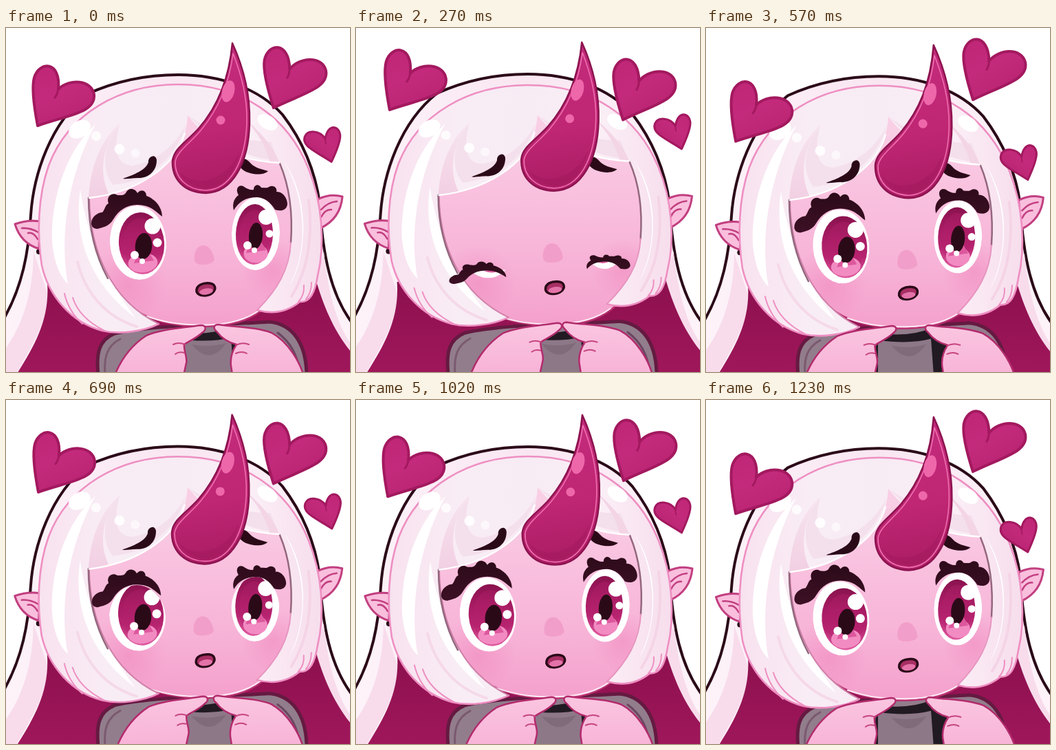
These frames come from a looping animation (500 by 500 pixels, 1.33 s). An HTML page with a canvas:

```html
<!DOCTYPE html>
<html lang="en">
<head>
<meta charset="utf-8">
<title>Shy horned girl</title>
<style>
html, body { margin: 0; width: 100%; height: 100%; overflow: hidden; background: #fff; }
canvas { display: block; width: 100vw; height: 100vh; }
</style>
</head>
<body>
<canvas id="stage" width="500" height="500"></canvas>
<script>
const ctx = document.getElementById('stage').getContext('2d');
const LOOP = 1330;
const STARTS = [0, 60, 120, 180, 240, 300, 360, 390, 450, 510, 570, 630, 690, 720,
  780, 840, 900, 960, 1020, 1080, 1140, 1170, 1230];
const INK = '#2b0a18', PINK = '#ee8fc2', WINE = '#a3195f';

// ---------- helpers ----------
function shape(d, fill, stroke, width = 2.5) {
  const path = new Path2D(d);
  if (fill) { ctx.fillStyle = fill; ctx.fill(path); }
  if (stroke) { ctx.strokeStyle = stroke; ctx.lineWidth = width; ctx.stroke(path); }
}
function oval(x, y, rx, ry, fill, turn = 0) {
  ctx.beginPath();
  ctx.ellipse(x, y, rx, ry, turn, 0, 7);
  ctx.fillStyle = fill;
  ctx.fill();
}
const dot = (x, y, r, fill = '#fff') => oval(x, y, r, r, fill);

function group(dx, dy, draw) {
  ctx.save();
  ctx.translate(dx, dy);
  draw();
  ctx.restore();
}
function ramp(x0, y0, x1, y1, ...colors) {
  const g = ctx.createLinearGradient(x0, y0, x1, y1);
  colors.forEach((c, i) => g.addColorStop(i / (colors.length - 1), c));
  return g;
}
function glow(x, y, r, rgb, alpha) {
  const g = ctx.createRadialGradient(x, y, 0, x, y, r);
  g.addColorStop(0, `rgba(${rgb},${alpha})`);
  g.addColorStop(1, `rgba(${rgb},0)`);
  dot(x, y, r, g);
}
function smooth(a, b, v) {
  const u = Math.min(1, Math.max(0, (v - a) / (b - a)));
  return u * u * (3 - 2 * u);
}

// ---------- motion ----------
// Bob: -1 is the highest pose, 1 the lowest, with a short rest at both ends.
function bob(t) {
  const p = t % (LOOP / 2);
  const s = p < 360 ? -Math.sin(Math.PI * p / 360) : Math.sin(Math.PI * (p - 360) / 305);
  return Math.tanh(1.4 * s) / Math.tanh(1.4);
}
const blinkFrom = (t, start) =>
  smooth(start, start + 105, t) * (1 - smooth(start + 105, start + 225, t));
const blink = t => blinkFrom(t, 145) + blinkFrom(t, 667);

// ---------- parts ----------
function backHair() {
  shape('M-4 424C24 376 33 325 36 272C40 212 65 138 118 96C162 76 208 68 250 68C312 68 368 88 402 126C434 168 450 212 456 255C460 330 472 388 504 430V510H-4Z',
    ramp(0, 0, 500, 0, '#fdf3f9', '#f9e6f1', '#fdf3f9'), INK, 4);
  shape('M40 325C40 390 20 440 -4 470V504H14C45 450 62 420 60 385Z', '#f8dcec');
  shape('M462 325C468 390 485 440 504 462V476C475 440 460 410 450 370Z', '#f8dcec');
  shape('M60 370C64 425 40 465 11 510H504V474C476 440 462 405 450 365Z',
    ramp(0, 370, 0, 500, '#8d104e', '#9f175b'));
}
function body() {
  shape('M134 504C131 474 134 454 158 444C220 430 320 432 382 427C416 430 436 457 437 504Z',
    '#927d8c', '#651a41', 5);
  shape('M144 504C142 478 147 462 166 452', null, '#7b5a70', 3);
  shape('M395 443C414 457 425 477 427 504', null, '#6b4660', 3);
  shape('M243 504L248 442Q298 448 328 434L350 450V504Z', '#211a22');
  shape('M250 504V452Q296 458 327 450L331 504Z', '#8d7888');
  shape('M270 460Q296 492 320 458Q296 465 270 460Z', '#806b7b');
}
function ears() {
  dot(48, 325, 4, INK);
  shape('M49 281C36 279 24 281 13 285C19 305 32 316 48 321Z', '#f9bfdd', '#c23f80', 3);
  shape('M23 291Q35 290 47 297M32 298Q40 296 46 307', null, '#c23f80', 2.5);
  shape('M453 249C465 243 478 242 489 245C487 267 476 282 457 291Z', '#f9bfdd', '#c23f80', 3);
  shape('M458 264Q468 253 481 252M458 275Q464 263 473 264', null, '#c23f80', 2.5);
}
function face() {
  shape('M118 180C112 280 125 350 165 390C195 424 240 434 290 434C330 433 352 425 372 410C410 380 422 320 418 250L395 165L262 110Z',
    ramp(0, 150, 0, 434, '#f9cfe5', '#f9c0de', '#f7b3d7', '#f4a0cc'), '#b93271', 2.5);
  shape('M205 419C235 430 262 432 290 431.5C325 431 350 424 370 409', null, '#fdeaf4', 2);
  glow(178, 372, 55, '238,122,181', .4);
  glow(388, 352, 45, '238,122,181', .4);
}

const HAIR_RIM = 'M222 430C200 441 165 446 140 440C95 428 62 390 52 345C45 300 46 245 62 200C90 125 165 82 250 82C345 82 410 130 440 205C460 255 464 315 453 360C449 385 442 399 427 398C407 414 386 416 365 410';
const HAIR_EDGE = 'C395 380 412 350 415 300C416 260 410 225 397 196C375 195 355 191 338 186C310 172 284 152 264 127C262 190 200 238 121 247C122 320 150 395 222 430Z';

function frontHair() {
  shape(HAIR_RIM + HAIR_EDGE,
    ramp(50, 0, 455, 0, '#f8e2ef', '#f9edf5', '#f7ebf4', '#fbeff6', '#f7deed'));
  ctx.save();
  ctx.clip(new Path2D(HAIR_RIM + HAIR_EDGE));
  shape('M165 140C140 170 138 205 155 228C200 225 245 195 262 140Q235 190 185 200Q150 200 165 140Z', '#f4e0ec');
  shape('M264 127Q330 190 395 192L385 165Q320 165 264 127Z', '#f4dfec');
  shape('M167 137C136 163 122 205 120 249L150 242C134 210 140 170 167 137Z',
    ramp(0, 140, 0, 248, '#f7e4ef', '#f2cfe3'));
  shape('M345 130C375 155 392 178 398 198L384 196C378 172 366 152 345 130Z', '#f3d5e6');
  shape('M130 140C86 180 65 250 67 310C70 345 80 362 90 372C78 305 88 220 130 140Z', '#fff');
  shape('M108 235C98 300 120 370 188 421C150 370 119 310 108 235Z', '#fff');
  shape('M405 195C436 250 440 320 412 375C432 345 448 260 405 195Z', '#fff');
  shape('M104 340C115 385 145 420 190 434', null, '#f5d9e9', 4);
  shape('M440 250C447 310 437 355 415 390', null, '#f5d4e7', 4);
  ctx.restore();
  shape(HAIR_RIM, null, PINK, 2.6);
  shape('M85 386Q91 412 111 430M97 392Q106 421 143 440M433 374Q434 388 425 398M444 370Q444 385 436 394', null, PINK, 2);
  shape('M121 247C122 320 150 395 222 430', null, '#d080a9', 2);
  shape('M120 247C120 285 127 325 148 364M398 197C412 230 417 270 414 312', null, '#94677e', 2.5);
  shape('M414 312C412 350 395 380 365 410', null, '#e794c0', 2);
  shape('M121 247C190 239 246 202 260 153M397 196C375 195 355 191 338 186', null, '#fff', 2.3);
  oval(107, 147, 17, 12, '#fff', -.55);
  oval(380, 137, 16, 10, '#fff', .55);
  dot(131, 157, 7, '#fffc');
  dot(165, 176, 7.5, '#fffd');
  dot(188, 182, 6.5, '#fff9');
}
function horn(h) {
  ctx.save();
  ctx.transform(1, 0, .0138 * h, 1 + .023 * h, 1.7 * h, 2.5 * h);
  shape('M329 22C344 55 355 95 354 137C353 195 330 239 290 240C258 239 241 219 242 193C244 175 262 166 280 146C306 116 324 78 329 22Z',
    ramp(280, 60, 310, 240, '#c22a7a', '#bf2673', '#a91c63'), '#8c134f', 2.5);
  shape('M330 37C342 68 351 100 350 138C348 193 327 235 290 236C262 235 245 217 246 194C249 179 266 169 283 149C308 119 324 84 330 37Z',
    null, '#ef6eae', 1.6);
  shape('M252 208C275 235 321 222 339 180C333 216 310 234 287 232C270 231 257 222 252 208Z', '#9d185a66');
  oval(323, 92, 9, 16, '#ee67aa', .25);
  dot(312, 134, 6.5, '#ee67aa');
  ctx.restore();
}

const leftEye = {
  x: 192, y: 312, rx: 41, ry: 54, ix: 197, iy: 313, irx: 33, iry: 45, px: 200, py: 317, turn: -.08,
  sparks: [[213, 288, 11.5], [220, 312, 6.5], [187, 330, 6], [198, 339, 4]],
  lash: 'M124 284C124 274 134 268 140 268C144 264 144 257 149 255C145 244 155 238 162 243C167 243 171 244 174 240C178 231 188 233 191 240C197 233 204 237 204 244C216 248 227 260 227 274C219 268 212 260 200 258C180 254 165 263 156 278C150 289 139 290 133 292C128 292 124 289 124 284Z'
};
const rightEye = {
  x: 363, y: 299, rx: 35, ry: 53, ix: 361, iy: 300, irx: 27, iry: 44, px: 363, py: 302, turn: .03,
  sparks: [[378, 275, 11], [383, 299, 5.5], [351, 316, 6], [361, 323, 4]],
  lash: 'M331 265C328 254 333 246 338 243C333 235 337 227 345 230C350 234 356 236 360 235C360 227 368 226 371 232C376 232 380 233 382 231C389 227 395 233 393 238C401 237 409 246 409 256C408 265 400 267 391 264C384 253 377 247 365 246C348 246 338 253 331 265Z'
};

function eye(e, shut) {
  const top = e.y - e.ry, bottom = e.y + e.ry;
  const cut = top + shut * 2 * e.ry * .92;
  ctx.save();
  ctx.beginPath();
  ctx.ellipse(e.x, (cut + bottom) / 2, e.rx, (bottom - cut) / 2, e.turn, 0, 7);
  ctx.clip();
  oval(e.x, e.y, e.rx, e.ry, '#fff', e.turn);
  oval(e.ix, e.iy, e.irx, e.iry,
    ramp(0, e.iy - e.iry, 0, e.iy + e.iry, '#89124e', '#a61b62', '#b72470', '#e05da1'), e.turn);
  oval(e.ix, e.iy + 2, e.irx * .82, e.iry * .86, '#b4236e55', e.turn);
  oval(e.ix + 2, e.iy + e.iry * .63, e.irx * .65, e.iry * .31, '#f28bc2', e.turn);
  shape(`M${e.px - 7} ${e.py + 8}L${e.px - 14} ${e.py + 25}L${e.px + 15} ${e.py + 21}L${e.px + 7} ${e.py + 7}Z`, '#dd579d');
  oval(e.px, e.py, e.irx * .37, 19, INK, .08);
  e.sparks.forEach(s => dot(...s));
  ctx.restore();
  ctx.save();
  ctx.translate(e.x, top + shut * e.ry * 1.85);
  ctx.scale(1 - .2 * shut, 1 - .45 * shut);
  ctx.translate(-e.x, -top);
  shape(e.lash, ramp(0, top - 25, 0, top + 30, '#2b0a18', '#3c1024'));
  ctx.restore();
}
function features(h, shut) {
  group(4.7 * h, 6 * h, () => eye(leftEye, shut));
  group(3.5 * h, 5 * h, () => eye(rightEye, shut));
  group(5 * h, 7.5 * h, () =>
    shape('M274 339C272 326 278 316 287 316C296 316 301 326 303 337C300 343 292 344 286 344C280 344 276 343 274 339Z', '#f19fca'));
  group(4 * h, 6 * h, () => {
    shape('M277 383C276 374 286 370 296 371C305 372 306 380 300 385C292 391 279 390 277 383Z', '#a72f64', INK, 3.5);
    oval(291, 383, 10, 4.5, '#e373a9', -.15);
  });
}
function brows(h) {
  group(5 * h, 6.7 * h, () =>
    shape('M170 219C186 213 203 207 207 195C206 186 218 182 219 192C219 209 206 219 191 218C182 218 175 220 170 219Z', INK));
  group(3.7 * h, 6.7 * h, () =>
    shape('M337 193C343 187 350 190 355 196C362 204 372 205 381 208C374 215 356 213 347 208C341 204 336 199 337 193Z', INK));
}
function hands(w) {
  const up = Math.min(w, 0), apart = Math.max(w, 0) ** 4;
  const dy = w < 0 ? 3.5 * w : w;
  const skin = ramp(0, 430, 0, 500, '#fac6e0', '#f8b4d8');
  group(-10 * up - 18 * apart, dy, () => {
    shape('M156 510C165 485 181 462 204 447C228 437 258 436 283 432C291 432 292 438 285 443C278 450 268 454 259 460C258 470 264 478 262 487L257 510Z',
      skin, '#b32b6d', 2.5);
    shape('M260 460Q251 456 243 460M259 472Q251 470 246 474', null, '#c6447f', 2);
  });
  group(2.5 * up + 22 * apart, dy, () => {
    shape('M434 510C428 486 410 456 386 443C362 434 334 435 309 431C301 431 301 437 306 441C312 449 322 457 335 460C327 472 326 483 327 491L330 510Z',
      skin, '#b32b6d', 2.5);
    shape('M334 461Q344 456 353 460M334 473Q343 469 350 473', null, '#c6447f', 2);
  });
}
function heart(x, y, size, turn, flip = 1) {
  ctx.save();
  ctx.translate(x, y);
  ctx.rotate(turn);
  ctx.scale(size * flip, size);
  shape('M0 -1C-5 -27 -9 -56 -5 -71C3 -96 34 -95 30 -54C46 -70 79 -68 82 -46C84 -20 46 -17 0 -1Z',
    ramp(0, -90, 40, 0, '#c02676', '#c32a7b', '#ba2472'), WINE, 4 / Math.sqrt(size));
  shape('M30 -55Q29 -47 25 -42', null, WINE, 3);
  ctx.restore();
}
function hearts(w) {
  heart(46 - 3 * w, 143 + 24.5 * w, 1, 0);
  heart(389 - w * w, 117 - 15.5 * w + 3 * w * w, 1, -.12);
  heart(473 - 3 * w - 3 * w * w, 195 + 24 * w + 4.5 * w * w, .57, .25, -1);
}

// ---------- frame ----------
function draw(t) {
  const w = bob(t), shut = blink(t);
  const h = .7 * w + .3 * w * w;
  const lock = w < 0 ? 10 * w : 5 * w;
  ctx.fillStyle = '#fff';
  ctx.fillRect(0, 0, 500, 500);
  ctx.lineJoin = ctx.lineCap = 'round';

  group(h, 2.5 * h, backHair);
  group(0, 2 * h, body);
  group(1.5 * h, 1.5 * h, ears);
  group(h, 3 * h, face);
  // Front hair stretches so its tips swing further than the crown.
  ctx.save();
  ctx.translate(h, 150 + 2.5 * h);
  ctx.scale(1, 1 + (lock - 2.5 * h) / 280);
  ctx.translate(0, -150);
  frontHair();
  ctx.restore();
  features(h, shut);
  brows(h);
  horn(h);
  hands(w);
  hearts(w);
}
function tick() {
  const t = performance.now() % LOOP;
  draw(STARTS.findLast(s => s <= t));
  requestAnimationFrame(tick);
}
tick();
</script>
</body>
</html>
```
